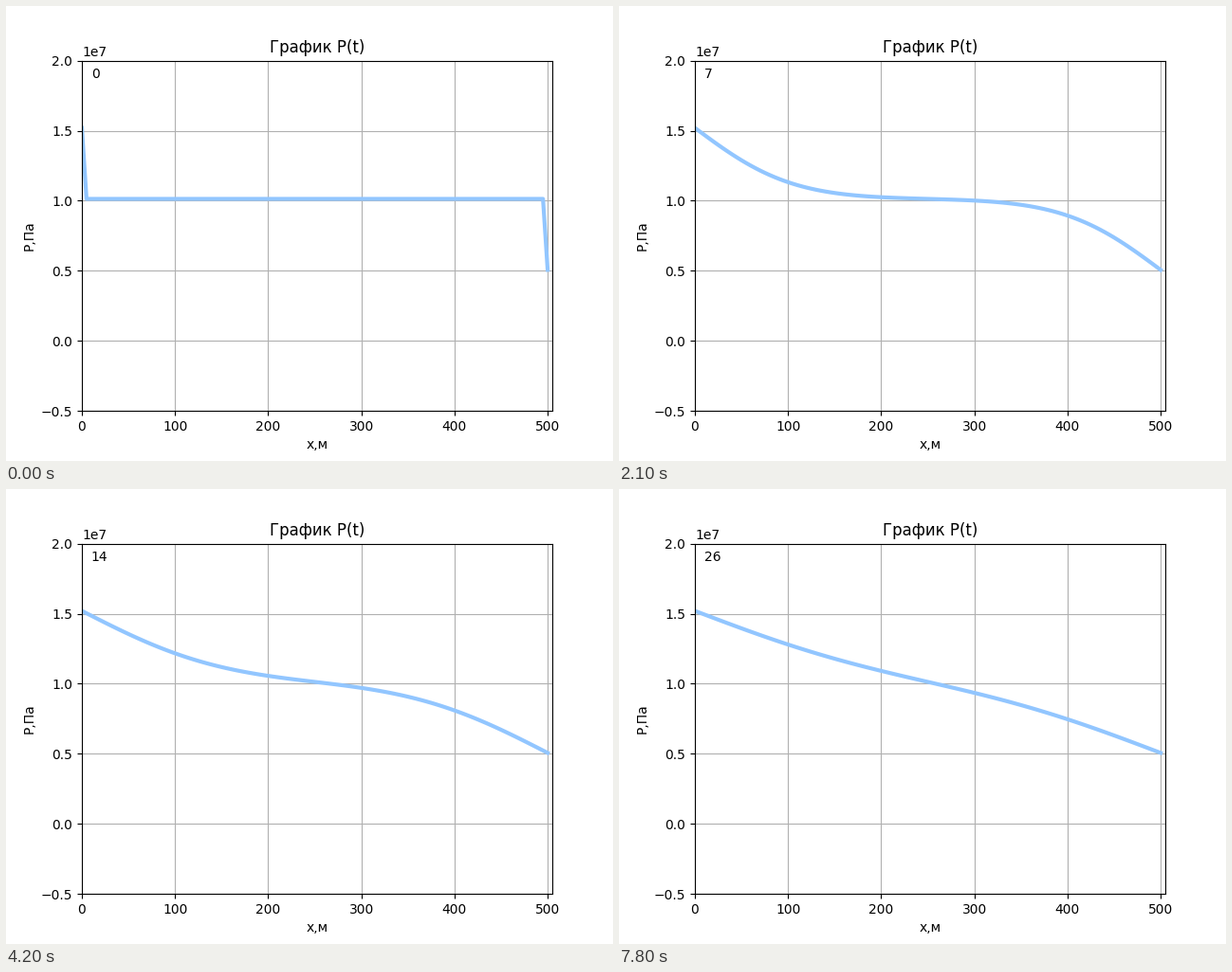
A matplotlib script for the animation above (8 s loop, 640 px wide and 480 px high).

```python
import numpy as np
import matplotlib.pyplot as plt
from matplotlib.animation import FuncAnimation

ATM = 101325
LENGTH, NODES = 500, 101
DIFFUSION = 535      # m² per time step
TICKS, TICKS_PER_STEP = 80, 3


def solve_pressure(steps):
    """Implicit diffusion between two fixed boundary pressures."""
    spacing = LENGTH / (NODES - 1)
    r = DIFFUSION / spacing**2
    matrix = np.eye(NODES)
    for i in range(1, NODES - 1):
        matrix[i, i - 1:i + 2] = -r, 1 + 2 * r, -r
    pressure = np.full(NODES, 100.0 * ATM)
    pressure[0], pressure[-1] = 150 * ATM, 50 * ATM
    history = [pressure]
    for _ in range(steps):
        pressure = np.linalg.solve(matrix, pressure)
        history.append(pressure)
    return history


history = solve_pressure((TICKS - 1) // TICKS_PER_STEP)

fig, ax = plt.subplots(figsize=(6.4, 4.8), dpi=100)
ax.set(xlim=(0, 505), ylim=(-0.5e7, 2e7),
       title="График P(t)", xlabel="x,м", ylabel="P,Па")
ax.grid(True)
line, = ax.plot(np.linspace(0, LENGTH, NODES), history[0],
                color="#92C6FF", linewidth=3)
label = ax.text(0.02, 0.95, "0", transform=ax.transAxes)


def update(tick):
    step = tick // TICKS_PER_STEP
    line.set_ydata(history[step])
    label.set_text(str(step))
    return line, label


anim = FuncAnimation(fig, update, frames=TICKS, interval=100,
                     repeat=True, repeat_delay=0)
plt.show()
```
